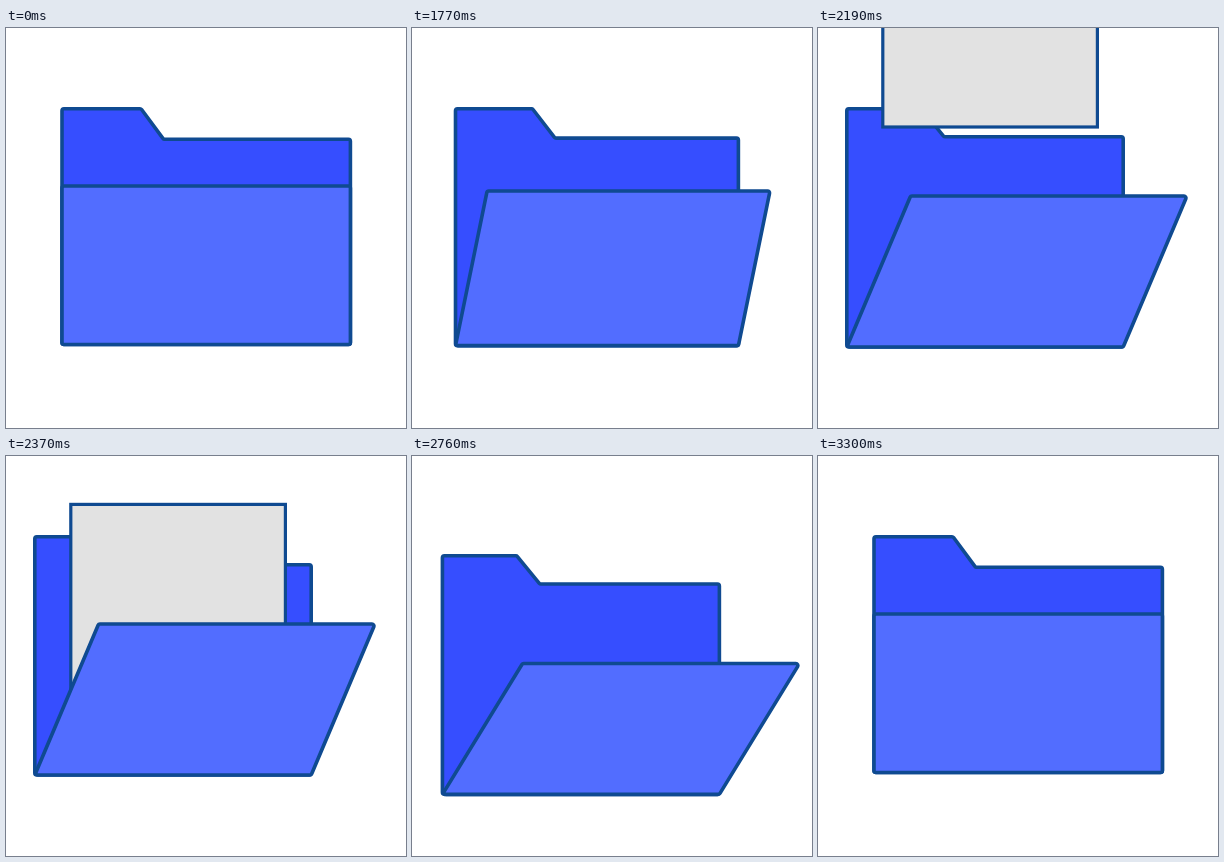
Recreate the animation shown at these times as an HTML page with a canvas. Size 400 by 400 pixels, loop 3.33 s.

```html
<!DOCTYPE html>
<html lang="en">
<head>
<meta charset="utf-8">
<title>Folder</title>
<style>
  html, body { margin: 0; width: 100%; height: 100%; overflow: hidden; background: #fff; }
  canvas { display: block; width: 400px; height: 400px; }
</style>
</head>
<body>
<canvas id="stage" width="400" height="400"></canvas>
<script>
const ctx = document.getElementById('stage').getContext('2d');
const LOOP = 3330, STEP = 30;
const INK = '#0f4a91', BACK = '#364eff', FRONT = '#526dff', PAPER = '#e2e2e2';
const FLAP_LEAD = 20; // the flap runs slightly ahead of the body
const CORNER = 2;

const closed = { left: 56, right: 344.4, top: 80.7, bottom: 316.5, tab: 79, lean: 0, flap: 158 };
const open = { left: 28.8, right: 305.2, top: 80.7, bottom: 319, tab: 74.5, lean: 63.8, flap: 168 };
const hit = { ...open, top: 104.7, bottom: 343, lean: 68, flap: 197 };
const pressed = { ...open, top: 102.5, bottom: 341, lean: 88, flap: 217.5 };
const bounced = { left: 45, right: 327, top: 75.7, bottom: 314.7, tab: 73.5, lean: 40.5, flap: 157.7 };

const keys = [
  [0, closed], [1515, closed], [2070, open], [2430, open],
  [2590, hit], [2730, pressed], [3030, bounced], [3300, closed], [3400, closed]
];

const paper = { x: 64.8, w: 214.6, h: 200, from: 2070, to: 2580, speed: 0.83 };

const mix = (a, b, k) => a + (b - a) * k;

function poseAt(t) {
  const i = keys.findIndex(([time]) => time > t);
  const [t0, a] = keys[i - 1], [t1, b] = keys[i];
  const k = (t - t0) / (t1 - t0), pose = {};
  for (const name in a) pose[name] = mix(a[name], b[name], k);
  return pose;
}

function shape(points, fill) {
  const [[ax, ay], [bx, by]] = points;
  ctx.beginPath();
  ctx.moveTo((ax + bx) / 2, (ay + by) / 2);
  points.forEach((_, i) => {
    const p = points[(i + 1) % points.length], q = points[(i + 2) % points.length];
    ctx.arcTo(...p, ...q, CORNER);
  });
  ctx.closePath();
  ctx.fillStyle = fill;
  ctx.fill();
  ctx.stroke();
}

function drawBack({ left, right, top, bottom, tab }) {
  const w = right - left;
  const notchX = left + 0.352 * w, notchY = top + 0.2 * w - 27.2;
  shape([[left, top], [left + tab, top], [notchX, notchY], [right, notchY],
         [right, bottom], [left, bottom]], BACK);
}

function drawPaper(t, bottom) {
  if (t < paper.from || t >= paper.to) return;
  const y = (t - paper.from) * paper.speed - paper.h - 0.6;
  ctx.save();
  ctx.beginPath();
  ctx.rect(0, 0, 400, bottom);
  ctx.clip();
  ctx.lineJoin = 'miter';
  ctx.lineWidth = 3.2;
  ctx.fillStyle = PAPER;
  ctx.fillRect(paper.x, y, paper.w, paper.h);
  ctx.strokeRect(paper.x, y, paper.w, paper.h);
  ctx.restore();
}

function drawFlap({ left, right, bottom }, { lean, flap }) {
  shape([[left + lean, flap], [right + lean, flap], [right, bottom], [left, bottom]], FRONT);
}

function draw(t) {
  const body = poseAt(t);
  ctx.fillStyle = '#fff';
  ctx.fillRect(0, 0, 400, 400);
  ctx.strokeStyle = INK;
  ctx.lineWidth = 3.6;
  ctx.lineJoin = 'round';
  drawBack(body);
  drawPaper(t, body.bottom);
  drawFlap(body, poseAt(t + FLAP_LEAD));
}

const begin = performance.now();
function tick() {
  const t = (performance.now() - begin) % LOOP;
  draw(Math.floor(t / STEP) * STEP);
  requestAnimationFrame(tick);
}
tick();
</script>
</body>
</html>
```
